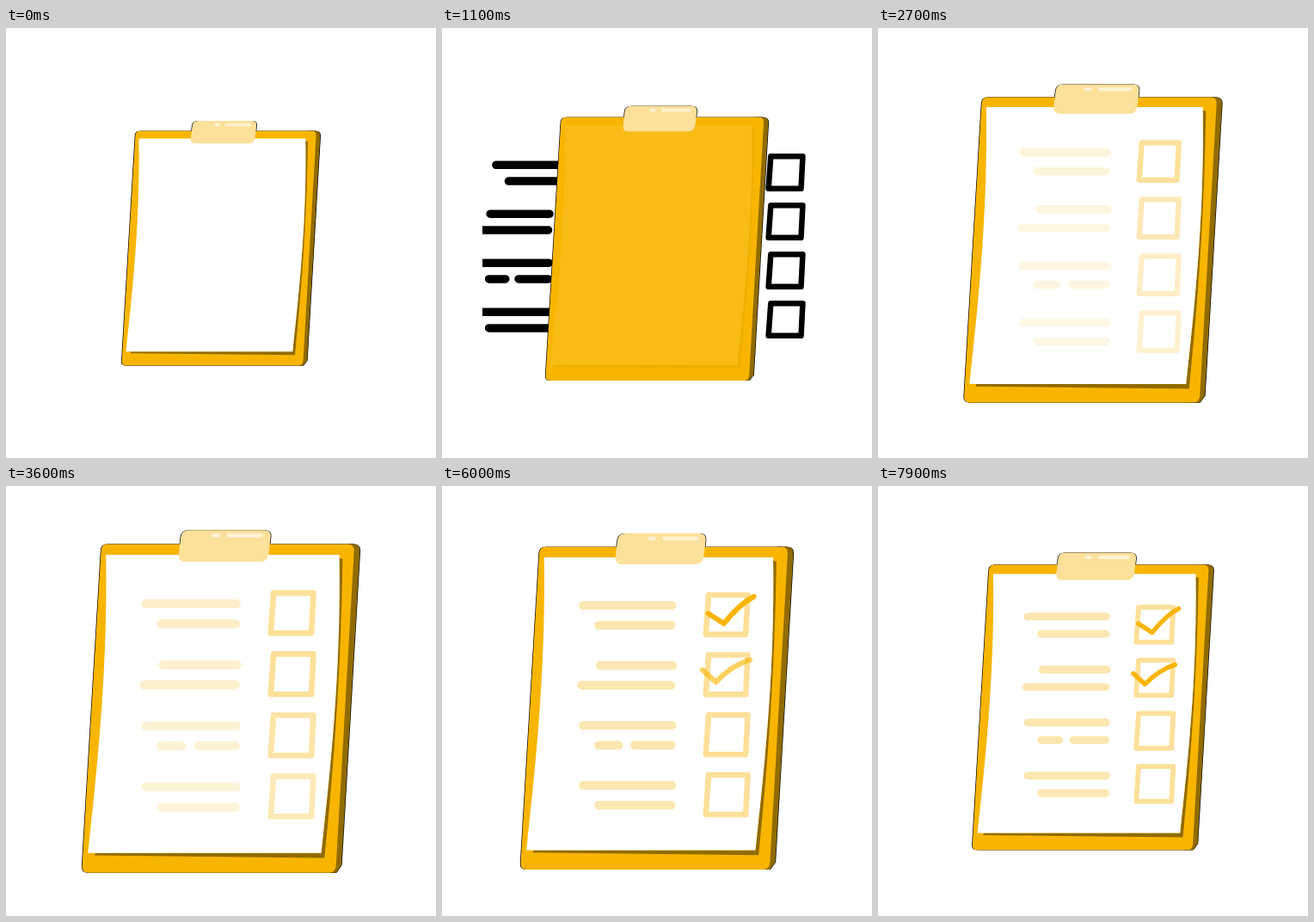
Animation of 500x500 px, one loop 8000 ms. Source, as an HTML page with a canvas:

```html
<!DOCTYPE html>
<html lang="en">
<head>
<meta charset="utf-8">
<title>Checklist</title>
<style>
html, body { margin: 0; width: 100%; height: 100%; overflow: hidden; background: #fff; }
canvas { display: block; width: 500px; height: 500px; }
</style>
</head>
<body>
<canvas id="stage" width="500" height="500"></canvas>
<script>
const ctx = document.getElementById('stage').getContext('2d');
const LOOP = 8000, STEP = 100, ROW = 74.4;
const GOLD = '#f8b500', DARK = '#916b00', PALE = '#fde09a', LINE = '#fce7b2';

const side = new Path2D('M400 59H412Q419 60 419 67L396.5 450L390 459H378Z');
const front = new Path2D('M112 59H404Q412.5 59 412 67L390 451Q389 459 381 459H88.5Q80.5 459 81 451L104 67Q104.5 59 112 59Z');
const paper = new Path2D('M110 72H394C396 200 386 310 372 435H88C102 310 112 200 110 72Z');
const shadow = new Path2D('M97 435L96 438L376 441C388 322 396 212 398 77L394 76C396 200 386 310 372 435Z');
const clip = new Path2D('M211 42H302.5Q311 42 310.5 50L308 71Q306.5 80.5 298 80.5H206Q198 80.5 198.5 72L201 51Q202 42 211 42Z');
const gloss = new Path2D('M241 48.5H246M259 48.5H299');
const box = new Path2D('M314 118.5H362.5L360 167.5H310.5Z');
const ticks = [
  { path: new Path2D('M313.5 141.5L333 154Q352 130 370 120.5'), start: 4500, time: 1000 },
  { path: new Path2D('M306.5 211.5L323 226.5Q341 207 365 199'), start: 5400, time: 950 }
];

// Each row: upper line, then the segments of the lower line.
const rows = [
  [[153, 274], [172, 273]],
  [[174, 275], [151, 273]],
  [[153, 274], [172, 208], [217, 273]],
  [[153, 274], [172, 273]]
];

const clamp = v => Math.max(0, Math.min(1, v));
const ramp = (t, start, time) => clamp((t - start) / time);
const slide = (t, time) => (1 - ramp(t, 1040, time)) ** 2;

function boardScale(t) {
  const width = t < 4500 ? 232 + 116 * t / 4500 : 348 - 66 * (t - 4500) / 3400;
  return width / 340;
}

function fill(path, color) {
  ctx.fillStyle = color;
  ctx.fill(path);
}

function stroke(path, color, width) {
  ctx.strokeStyle = color;
  ctx.lineWidth = width;
  ctx.stroke(path);
}

function drawLines(i, width) {
  ctx.lineWidth = width;
  ctx.beginPath();
  rows[i].forEach(([a, b], n) => {
    const y = 131.5 + i * ROW + (n ? 24.5 : 0);
    ctx.moveTo(a + 5.5, y);
    ctx.lineTo(b - 5.5, y);
  });
  ctx.stroke();
}

function drawRows(t, ink) {
  const extra = ink ? 1.5 : 0;
  for (let i = 0; i < rows.length; i++) {
    ctx.save();
    ctx.globalAlpha = ink ? 1 : ramp(t, 1040, 3700 + 450 * i);
    ctx.strokeStyle = ink || LINE;
    ctx.translate((i ? -196 : -164) * slide(t, 1734), 0);
    drawLines(i, 11 + extra);
    ctx.restore();

    ctx.save();
    ctx.globalAlpha = ink ? 1 : ramp(t, 1040, 1600 + 670 * i);
    ctx.translate(118 * slide(t, 1506), i * ROW);
    stroke(box, ink || PALE, 7 + extra);
    ctx.restore();
  }
}

function zoom(s) {
  ctx.translate(250, 250);
  ctx.scale(s, s);
  ctx.translate(-250, -250);
}

// Thin dark rim on the slanted edges only.
function drawRim(size) {
  for (const dx of [-size, size]) {
    ctx.save();
    ctx.translate(dx, 0);
    for (const p of [side, front, clip]) fill(p, '#000');
    ctx.restore();
  }
}

function draw(t) {
  const s = boardScale(t);
  ctx.setTransform(1, 0, 0, 1, 0, 0);
  ctx.fillStyle = '#fff';
  ctx.fillRect(0, 0, 500, 500);
  ctx.lineCap = ctx.lineJoin = 'round';

  // Incoming rows are black until they pass over the board.
  if (t >= 1050 && t < 2900) {
    ctx.save();
    ctx.beginPath();
    ctx.rect(47, 0, 453, 500);
    ctx.clip();
    zoom(s);
    drawRows(t, '#000');
    ctx.restore();
  }

  ctx.save();
  zoom(s);
  drawRim(0.7 / s);
  fill(side, DARK);
  fill(front, GOLD);

  ctx.globalAlpha = t < 1000 ? 1 - t / 1000 : ramp(t, 1010, 1010);
  fill(shadow, DARK);
  fill(paper, '#fff');
  ctx.globalAlpha = 1;

  if (t >= 1050) {
    ctx.save();
    ctx.clip(paper);
    drawRows(t);
    ctx.restore();
  }
  for (const k of ticks) {
    ctx.globalAlpha = ramp(t, k.start, k.time);
    if (ctx.globalAlpha) stroke(k.path, GOLD, 6.5);
  }
  ctx.globalAlpha = 1;

  fill(clip, PALE);
  stroke(gloss, '#fef1d2', 5);
  ctx.restore();
}

const begin = performance.now();
function tick() {
  const t = (performance.now() - begin) % LOOP;
  draw(Math.floor(t / STEP) * STEP);
  requestAnimationFrame(tick);
}
tick();
</script>
</body>
</html>
```
